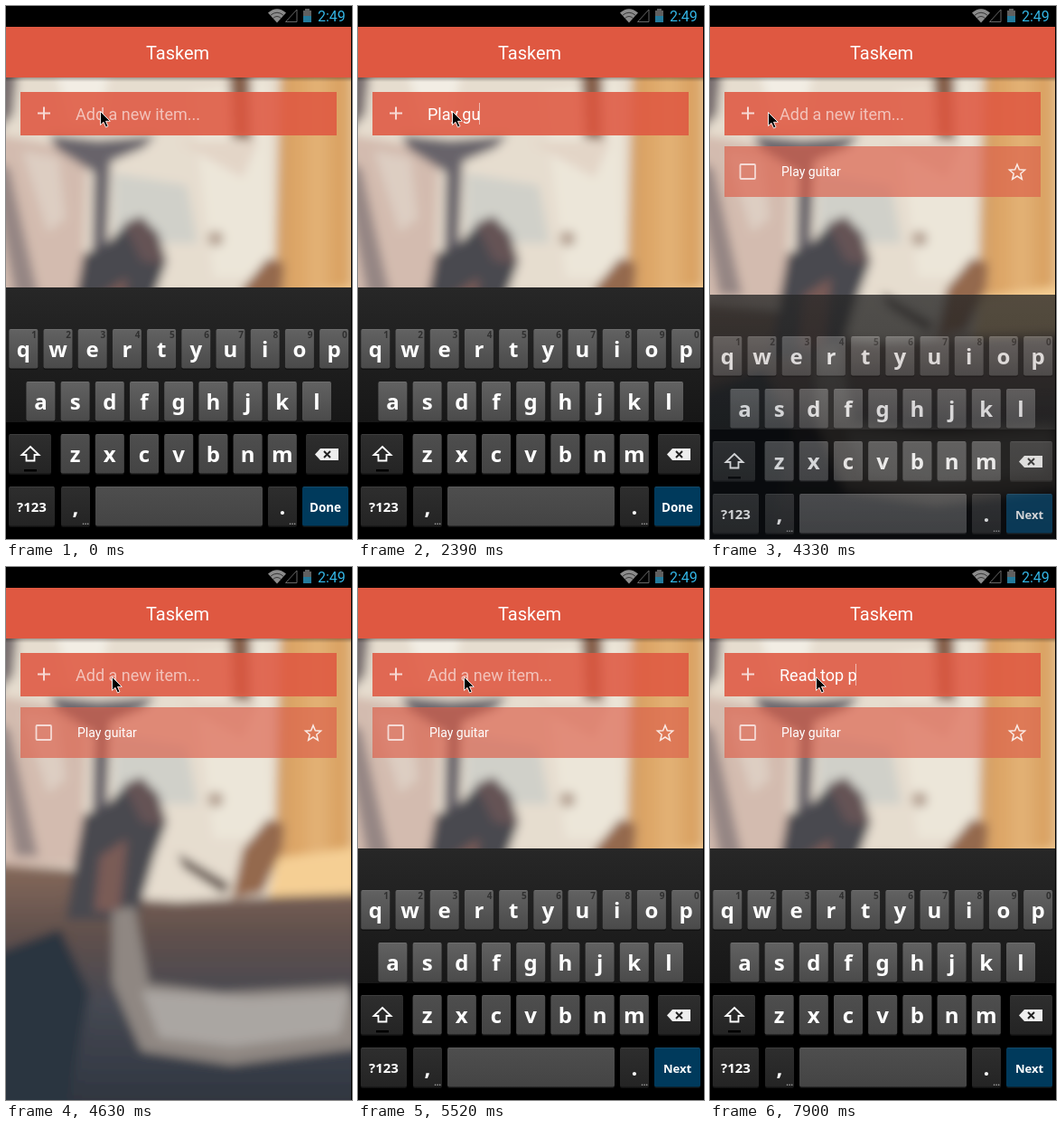
These frames come from a looping animation (383 px wide and 589 px high, 8000 ms). An HTML page:

```html
<!DOCTYPE html>
<html lang="en">
<head>
<meta charset="utf-8">
<title>Taskem</title>
<style>
html, body { margin: 0; width: 100%; height: 100%; overflow: hidden; background: #000; }
svg { display: block; width: 383px; height: 589px; }
text { font-family: Roboto, sans-serif; fill: #fff; white-space: pre; }
#keyboard text { font-family: "Noto Sans", "Open Sans", sans-serif; font-weight: 700; text-anchor: middle; }
</style>
</head>
<body>
<svg viewBox="0 0 383 589">
  <defs>
    <filter id="soft" filterUnits="userSpaceOnUse" x="-40" y="40" width="470" height="600">
      <feGaussianBlur stdDeviation="5.5"/>
    </filter>
    <linearGradient id="wood" x2="1" y2="0">
      <stop offset="0" stop-color="#cf9f6a"/><stop offset=".2" stop-color="#dda565"/>
      <stop offset=".4" stop-color="#e3b277"/><stop offset=".62" stop-color="#d89f5e"/>
      <stop offset=".78" stop-color="#ecd2ad"/><stop offset="1" stop-color="#f0dfc6"/>
    </linearGradient>
    <linearGradient id="table" x2="0" y2="1">
      <stop offset="0" stop-color="#86695a"/><stop offset=".25" stop-color="#60504c"/>
      <stop offset=".5" stop-color="#454852"/><stop offset="1" stop-color="#252d38"/>
    </linearGradient>
    <linearGradient id="shade" x2="0" y2="1">
      <stop offset="0" stop-color="#000" stop-opacity=".35"/><stop offset="1" stop-color="#000" stop-opacity="0"/>
    </linearGradient>
    <linearGradient id="panel" x2="0" y2="1">
      <stop offset="0" stop-color="#272727"/><stop offset="1" stop-color="#171717"/>
    </linearGradient>
    <linearGradient id="light" x2="0" y2="1">
      <stop offset="0" stop-color="#626262"/><stop offset="1" stop-color="#4a4a4a"/>
    </linearGradient>
    <linearGradient id="mid" x2="0" y2="1">
      <stop offset="0" stop-color="#4e4e4e"/><stop offset="1" stop-color="#444"/>
    </linearGradient>
    <linearGradient id="dark" x2="0" y2="1">
      <stop offset="0" stop-color="#2e2e2e"/><stop offset="1" stop-color="#242424"/>
    </linearGradient>
  </defs>

  <g filter="url(#soft)">
    <path fill="#e6ddcf" d="M-30 50H420V640H-30Z"/>
    <path fill="#d3bbaf" d="M-20 140L90 160L84 330H-20Z"/>
    <path fill="#ddcec2" d="M18 160L58 168L66 235L46 250Z"/>
    <path fill="#776d6e" d="M-20 60H14L8 120L-20 150Z"/>
    <path fill="#f2ede4" d="M52 60H116L104 130H70Z"/>
    <path fill="#958684" d="M-20 165L4 180L36 320H10Z"/>
    <path fill="#d0d0c9" d="M120 185L200 198L212 262L120 262Z"/>
    <path fill="#ece6d9" d="M205 95L290 80L294 300H230Z"/>
    <path fill="#e3d5c7" d="M190 150L280 148L262 190Z"/>
    <path fill="#68646a" d="M48 142L102 148L166 143L152 157L116 172L111 285H95L97 184L56 158Z"/>
    <path fill="url(#wood)" d="M304 50H420V380H296Z"/>
    <path fill="#f5cf94" d="M300 322L420 305V366H290Z"/>
    <path fill="#855f49" d="M246 60H270L272 148L250 146Z"/>
    <circle fill="#b8a596" cx="232" cy="257" r="9"/>
    <path fill="url(#table)" d="M-20 328L70 334L130 366L190 370L300 364L420 360V640H-20Z"/>
    <path fill="#494950" d="M86 274L110 264L132 242L150 234L168 250L178 282L164 320L144 390H66L78 318Z"/>
    <path fill="#655354" d="M130 240L150 232L170 254L176 286L150 282Z"/>
    <path fill="#7a5c57" d="M104 320L134 300L126 380H98Z"/>
    <path fill="#665851" d="M190 316L248 350L242 362L196 332Z"/>
    <path fill="#94694e" d="M250 366L262 312L290 278L308 284L306 310L284 360Z"/>
    <path fill="#2b343f" d="M-20 430L60 400L92 470L60 640H-20Z"/>
    <path fill="#8f8782" d="M118 380L142 375L158 460L240 470L380 462L400 530L250 550L150 535L118 460Z"/>
    <path fill="#aaa6a2" d="M150 468L270 476L380 470L370 515L250 530L170 520Z"/>
  </g>

  <path fill="url(#shade)" d="M0 78H383V84H0Z"/>
  <path fill="#df5841" d="M0 23H383V79H0Z"/>
  <path d="M0 0H383V23H0Z"/>
  <text x="190" y="58.5" font-size="20" text-anchor="middle">Taskem</text>

  <path fill="#8c8c8c" d="M290 7.500Q300 -1 310 7.500L300 18.500Z"/>
  <path fill="none" stroke="#222" stroke-width=".8" d="M292.500 10.500Q300 4 307.500 10.500M295.500 13.500Q300 9.500 304.500 13.500"/>
  <path fill="none" stroke="#666" d="M309.500 17.500H322V4Z"/>
  <path fill="#606060" d="M331 3H336V5H338V11H329V5H331Z"/>
  <path fill="#247a9b" d="M329 11H338V18H329Z"/>
  <text x="345" y="17" font-size="16" style="fill:#33b5e5">2:49</text>

  <path fill="#df5841" fill-opacity=".87" d="M16 95H366V143H16Z"/>
  <path stroke="#fff" stroke-opacity=".75" stroke-width="2" d="M35 118.500H49M42 111.500V125.500"/>
  <text id="hint" x="77" y="126" font-size="18" opacity=".6">Add a new item...</text>
  <text id="typed" x="77" y="126" font-size="18"></text>
  <path id="caret" stroke="#fff" stroke-opacity=".55" d="M.5 107V131"/>

  <g id="item">
    <path fill="#dd5f4a" fill-opacity=".66" d="M16 155H366V211H16Z"/>
    <rect x="33.500" y="175" width="16.500" height="16" rx="1" fill="none" stroke="#fff" stroke-opacity=".7" stroke-width="1.800"/>
    <text x="79" y="188" font-size="14">Play guitar</text>
    <path id="star" fill="none" stroke="#fff" stroke-opacity=".85" stroke-width="1.500"/>
  </g>

  <g id="keyboard">
    <path d="M0 311H383V640H0Z"/>
    <path fill="url(#panel)" d="M0 311H383V460H0Z"/>
    <g id="keys"></g>
    <path fill="none" stroke="#fff" stroke-width="1.800" d="M27 487L36.500 496H31.500V502.500H22.500V496H17.500Z"/>
    <path d="M20 512H34V514.500H20Z"/>
    <path fill="#eee" d="M342 495.500L348 489H368V502H348Z"/>
    <path stroke="#222" stroke-width="2" d="M352 492L359 499M359 492L352 499"/>
  </g>

  <path id="pointer" stroke="#fff" stroke-width=".9" d="M.5 .5V15.500L4 12.300L6.500 18L9 16.900L6.500 11.300H11.300Z"/>
  <path d="M382 0H383V589H382Z"/>
</svg>
<script>
const LOOP = 8000;
const $ = id => document.getElementById(id);

function add(tag, attrs, content = '') {
  const node = document.createElementNS('http://www.w3.org/2000/svg', tag);
  for (const name in attrs) node.setAttribute(name, attrs[name]);
  node.textContent = content;
  $('keys').append(node);
  return node;
}

function key(x, y, width, fill, label = '', size = 24, drop = 31) {
  add('rect', { x, y: y + 1, width, height: 44, rx: 2, fill: '#111' });
  add('rect', { x, y, width, height: 43.5, rx: 2, fill });
  add('path', { d: `M${x + 1} ${y + .5}h${width - 2}`, stroke: '#fff', 'stroke-opacity': .08 });
  return add('text', { x: x + width / 2, y: y + drop, 'font-size': size }, label);
}

function letters(row, x, y, fill) {
  [...row].forEach((letter, i) => key(x + 38.2 * i, y, 32, fill, letter));
}

letters('qwertyuiop', 3.3, 357, 'url(#light)');
for (let i = 0; i < 10; i++) {
  add('text', { x: 31 + 38.2 * i, y: 367, 'font-size': 10, style: 'fill:#303030' }, (i + 1) % 10);
}
letters('asdfghjkl', 22.4, 415, 'url(#light)');
key(3, 473, 47, 'url(#dark)');
letters('zxcvbnm', 60.6, 473, 'url(#mid)');
key(332, 473, 47, 'url(#dark)');
key(3, 531, 51, 'url(#dark)', '?123', 15, 28);
key(61, 531, 32, 'url(#dark)', ',');
key(99, 531, 185, 'url(#mid)');
key(290, 531, 32, 'url(#dark)', '.');
for (const x of [88, 317]) {
  add('text', { x, y: 573, 'font-size': 9, style: 'fill:#aaa' }, '…');
}
const action = key(328, 531, 51, '#003a5c', 'Done', 13.5, 28);

const starPoints = Array.from({ length: 10 }, (_, i) => {
  const r = i % 2 ? 4 : 9, a = (i / 5 - .5) * Math.PI;
  return `${340 + r * Math.cos(a)} ${184 + r * Math.sin(a)}`;
});
$('star').setAttribute('d', `M${starPoints.join('L')}Z`);

// Each track is a list of [start time, ...values], held until the next entry.
const typing = [
  [0, ''], [1200, 'P'], [1350, 'Pl'], [1500, 'Pla'], [1650, 'Play'], [1950, 'Play '],
  [2390, 'Play gu'], [2540, 'Play gui'], [2690, 'Play guita'], [2840, 'Play guitar'],
  [4180, ''], [6120, 'R'], [6270, 'Re'], [6410, 'Rea'], [6560, 'Read'], [6710, 'Read '],
  [7010, 'Read to'], [7310, 'Read top'], [7600, 'Read top '], [7900, 'Read top p']
];
const pointing = [
  [0, 104, 116], [3140, 98, 116], [3290, 80, 115], [3430, 60, 114], [3580, 45, 113], [3730, 38, 112.5],
  [4180, 46, 114], [4330, 64, 117], [4480, 98, 120], [4630, 117, 121]
];
const sliding = [
  [0, 0, 1], [4330, 8, .78], [4480, 42, .3], [4630, 60, 0], [5380, 52, .65], [5520, 0, 1]
];

const at = (track, time) => track.findLast(entry => entry[0] <= time).slice(1);

function render(time) {
  const [text] = at(typing, time);
  const [x, y] = at(pointing, time);
  const [offset, alpha] = at(sliding, time);
  const added = time >= 4180;

  $('typed').textContent = text;
  $('hint').style.display = text ? 'none' : '';
  $('caret').style.display = text ? '' : 'none';
  if (text) {
    const end = Math.round(76.5 + $('typed').getComputedTextLength());
    $('caret').setAttribute('transform', `translate(${end - 1})`);
  }
  $('item').style.display = added ? '' : 'none';
  action.textContent = added ? 'Next' : 'Done';
  action.setAttribute('font-size', added ? 13 : 13.5);
  $('pointer').setAttribute('transform', `translate(${x} ${y})`);
  $('keyboard').setAttribute('transform', `translate(0 ${offset})`);
  $('keyboard').setAttribute('opacity', alpha);
}

const start = performance.now();
function tick() {
  render((performance.now() - start) % LOOP);
  requestAnimationFrame(tick);
}
tick();
</script>
</body>
</html>
```
